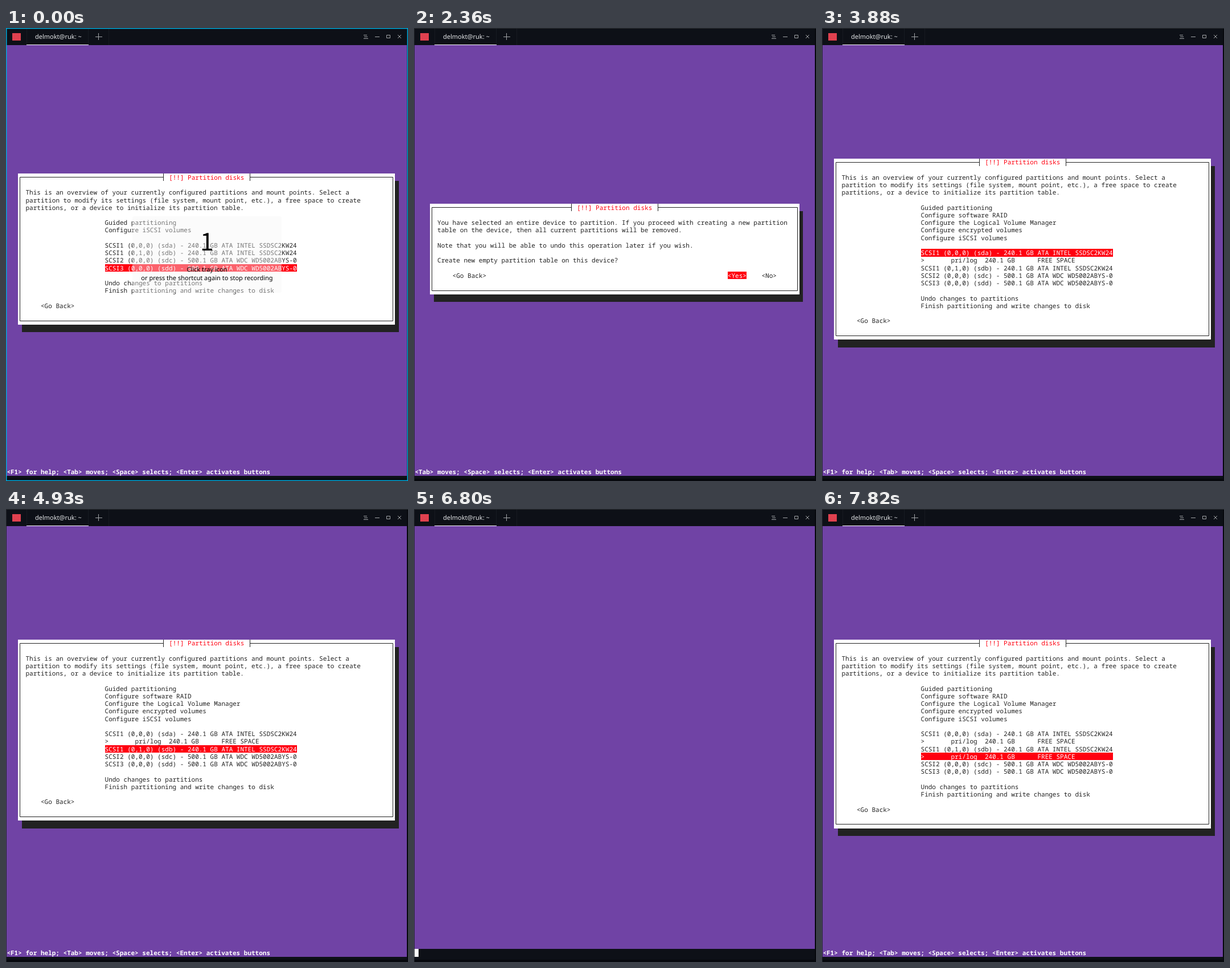
Write an HTML page that moves like this. It is 706 by 794 pixels and loops after 8000 ms.

```html
<!DOCTYPE html>
<html lang="en">
<head>
<meta charset="utf-8">
<title>Partition disks</title>
<style>
html, body { margin: 0; width: 100%; height: 100%; overflow: hidden; background: #0d1017; }
svg { display: block; width: 706px; height: 794px; }
text { white-space: pre; text-rendering: geometricPrecision; }
.mono { font: 11.033px "Noto Sans Mono", "DejaVu Sans Mono", monospace; }
.ui { font: 11px "Noto Sans", "Open Sans", sans-serif; }
.bold { font-weight: 700; }
</style>
</head>
<body>
<svg id="stage" viewBox="0 0 706 794" xmlns="http://www.w3.org/2000/svg"></svg>
<script>
const LOOP = 8000;
const CELL = 6.62, LINE = 13.24, LEFT = 1.4, TOP = 30;
const PURPLE = "#7043a5", INK = "#222222", RED = "#ff0010", WHITE = "#ffffff", DARK = "#0d1017";
const stage = document.getElementById("stage");
const colX = c => LEFT + c * CELL;
const rowY = r => TOP + r * LINE;

function add(parent, tag, attrs, content) {
  const el = document.createElementNS("http://www.w3.org/2000/svg", tag);
  for (const k in attrs) el.setAttribute(k, attrs[k]);
  if (content !== undefined) el.textContent = content;
  parent.appendChild(el);
  return el;
}
const rect = (p, x, y, width, height, fill) => add(p, "rect", { x, y, width, height, fill });
const stroke = (p, d, color) => add(p, "path", { d, stroke: color, fill: "none" });

// Filled block of terminal cells, snapped to whole pixels
function cells(p, c0, r0, c1, r1, fill) {
  const x = Math.round(colX(c0)), y = Math.round(rowY(r0));
  rect(p, x, y, Math.round(colX(c1)) - x, Math.round(rowY(r1)) - y, fill);
}

function print(p, col, row, str, fill = INK, cls = "mono") {
  add(p, "text", { x: colX(col), y: rowY(row + 0.5) + 4.1, fill, class: cls }, str);
}

function highlight(p, col, row, str, width = str.length) {
  cells(p, col, row, col + width, row + 1, RED);
  print(p, col, row, str, WHITE);
}

function dialog(p, c0, r0, c1, r1) {
  cells(p, c0 + 1, r0 + 1, c1 + 1, r1 + 1, INK);
  cells(p, c0, r0, c1, r1, WHITE);
  const mid = v => Math.floor(v) + 0.5;
  const x0 = mid(colX(c0 + 0.5)), x1 = mid(colX(c1 - 0.5));
  const y0 = mid(rowY(r0 + 0.5)), y1 = mid(rowY(r1 - 0.5));
  const t0 = mid(colX(41.5)), t1 = mid(colX(64.5));
  const top = Math.round(rowY(r0)), low = Math.round(rowY(r0 + 1));
  stroke(p, `M${t0} ${y0}H${x0}V${y1}H${x1}V${y0}H${t1}M${t0} ${top}V${low}M${t1} ${top}V${low}`, INK);
  print(p, 43, r0, "[!!] Partition disks", RED);
}

function screen(status) {
  const g = add(stage, "g", { visibility: "hidden" });
  rect(g, 1, 30, 703, status ? 755 : 741, PURPLE);
  if (status) print(g, 0, 56, status, WHITE, "mono bold");
  return g;
}

const KEYS = "<Tab> moves; <Space> selects; <Enter> activates buttons";
const INTRO = [
  "This is an overview of your currently configured partitions and mount points. Select a",
  "partition to modify its settings (file system, mount point, etc.), a free space to create",
  "partitions, or a device to initialize its partition table."
];
const FREE = ">       pri/log  240.1 GB      FREE SPACE";
const SDA = "SCSI1 (0,0,0) (sda) - 240.1 GB ATA INTEL SSDSC2KW24";
const SDB = "SCSI1 (0,1,0) (sdb) - 240.1 GB ATA INTEL SSDSC2KW24";
const SDC = "SCSI2 (0,0,0) (sdc) - 500.1 GB ATA WDC WD5002ABYS-0";
const SDD = "SCSI3 (0,0,0) (sdd) - 500.1 GB ATA WDC WD5002ABYS-0";
const END = ["", "Undo changes to partitions", "Finish partitioning and write changes to disk"];
const ISCSI = "Configure iSCSI volumes";
const FULL = ["Guided partitioning", "Configure software RAID", "Configure the Logical Volume Manager",
  "Configure encrypted volumes", ISCSI, ""];
const MENUS = {
  plain: { top: 17, items: ["Guided partitioning", ISCSI, "", SDA, SDB, SDC, SDD, ...END] },
  one: { top: 15, items: [...FULL, SDA, FREE, SDB, SDC, SDD, ...END] },
  two: { top: 15, items: [...FULL, SDA, FREE, SDB, FREE, SDC, SDD, ...END] }
};

function menu(name, selected) {
  const { top, items } = MENUS[name];
  const g = screen("<F1> for help; " + KEYS);
  const back = top + 7 + items.length;
  dialog(g, 3, top, 103, back + 3);
  INTRO.forEach((s, i) => print(g, 5, top + 2 + i, s));
  items.forEach((s, i) => {
    if (i === selected) highlight(g, 26, top + 6 + i, s, 51);
    else if (s) print(g, 26, top + 6 + i, s);
  });
  print(g, 9, back, "<Go Back>");
  return g;
}

function confirmBox(yes) {
  const g = screen(KEYS);
  dialog(g, 4, 21, 102, 33);
  print(g, 6, 23, "You have selected an entire device to partition. If you proceed with creating a new partition");
  print(g, 6, 24, "table on the device, then all current partitions will be removed.");
  print(g, 6, 26, "Note that you will be able to undo this operation later if you wish.");
  print(g, 6, 28, "Create new empty partition table on this device?");
  print(g, 10, 30, "<Go Back>");
  (yes ? highlight : print)(g, 83, 30, "<Yes>");
  (yes ? print : highlight)(g, 92, 30, "<No>");
  return g;
}

function blank() {
  const g = screen("");
  cells(g, 0, 56, 1, 57, WHITE);
  return g;
}

function frameAndTabs() {
  rect(stage, 0, 0, 706, 794, "#06080d");
  rect(stage, 1, 1, 703, 789, DARK);
  rect(stage, 0, 0, 706, 1, "#2b2f33");
  rect(stage, 0, 0, 1, 794, "#22262b");
  rect(stage, 11, 9, 15, 13, "#e0414f");
  for (const x of [36, 144, 180]) rect(stage, x, 1, 1, 29, "#171b22");
  rect(stage, 36, 29, 109, 2, WHITE);
  add(stage, "text", { x: 51, y: 19, fill: "#e4e6e8", class: "ui" }, "delmokt@ruk: ~");
  stroke(stage, "M157 15.5H169M162.5 9V21", "#a2a5a8");
  stroke(stage, "M628 12.5H634M629 15.5H635M628 18.5H636M648 15.5H656M668.5 12.5H674.5V17.5H668.5Z", "#a2a5a8");
  stroke(stage, "M688 12L694 18M694 12L688 18", "#a2a5a8");
}

function countdown() {
  const g = add(stage, "g", { visibility: "hidden" });
  add(g, "rect", { x: 222, y: 330, width: 262, height: 134, rx: 4, fill: "#f5f5f5", "fill-opacity": 0.4 });
  const line = (y, s, extra) => add(g, "text", { x: 353, y, "text-anchor": "middle", fill: "#000", ...extra }, s);
  line(390, "1", { style: 'font: 300 43px "Noto Sans CJK SC", "Noto Sans CJK JP", "Noto Sans", sans-serif' });
  line(427, "Click tray icon", { class: "ui" });
  line(442, "or press the shortcut again to stop recording", { class: "ui" });
  add(g, "rect", { x: 0.75, y: 0.75, width: 704.5, height: 792.5, fill: "none", stroke: "#00a5d6", "stroke-width": 1.5 });
  return g;
}

frameAndTabs();
const no = confirmBox(false), yes = confirmBox(true), empty = blank();
const steps = [
  [0, menu("plain", 6)],
  [460, menu("plain", 5)],
  [780, menu("plain", 4)],
  [1110, menu("plain", 3)],
  [1850, no],
  [2360, yes],
  [3380, empty],
  [3880, menu("one", 6)],
  [4600, menu("one", 7)],
  [4930, menu("one", 8)],
  [5480, no],
  [5990, yes],
  [6800, empty],
  [7240, menu("two", 8)],
  [7820, menu("two", 9)]
];
const overlay = countdown();
const show = (el, on) => el.setAttribute("visibility", on ? "visible" : "hidden");

let current = null;
const start = performance.now();
function draw(now) {
  const t = Math.max(0, now - start) % LOOP;
  const next = steps.filter(s => s[0] <= t).pop()[1];
  if (next !== current) {
    if (current) show(current, false);
    show(next, true);
    current = next;
  }
  show(overlay, t < 50);
  requestAnimationFrame(draw);
}
draw(start);
</script>
</body>
</html>
```
